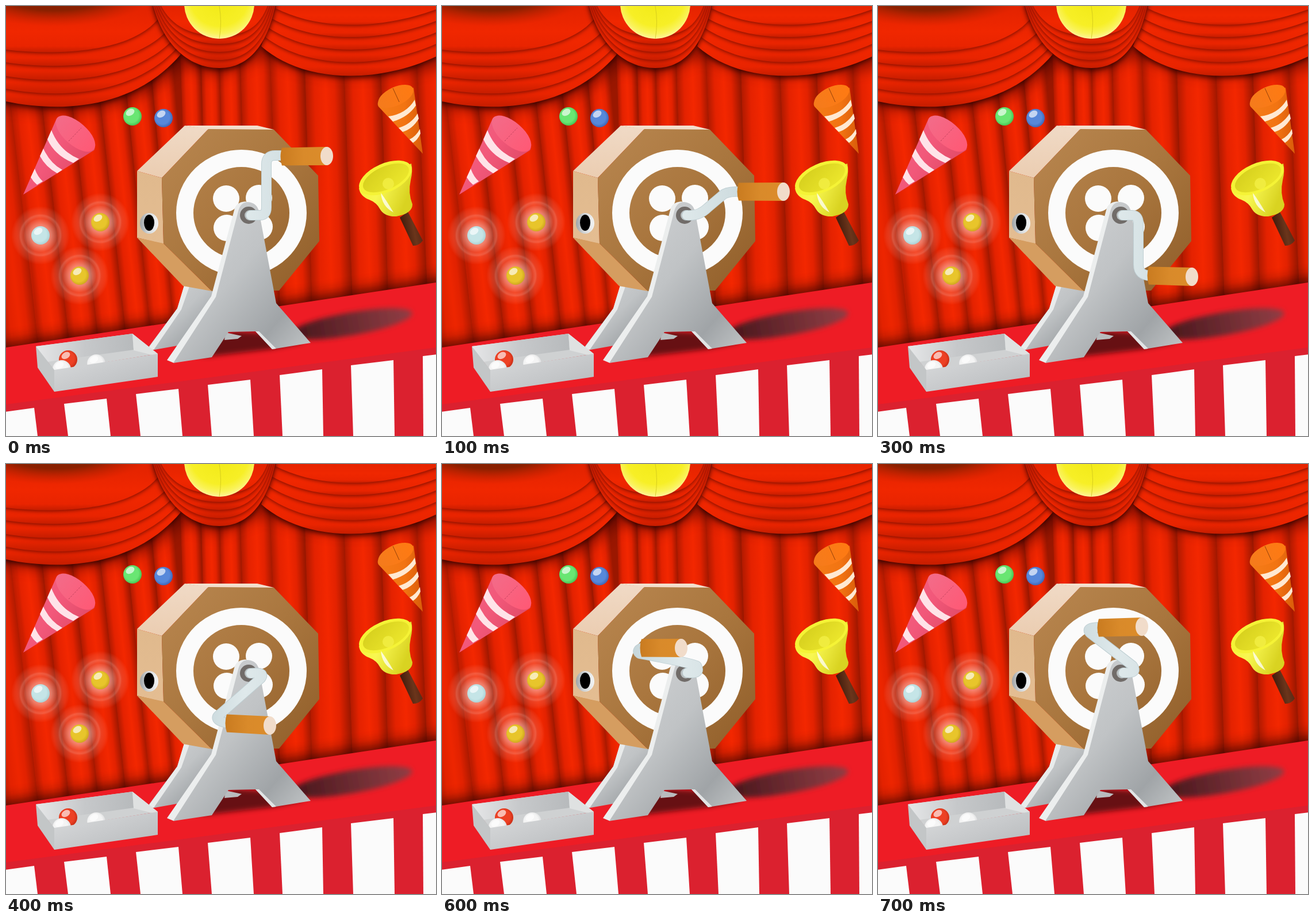
These frames come from a looping animation (748 by 748 pixels, 0.8 s). An HTML page:

```html
<!DOCTYPE html>
<html lang="en">
<head>
<meta charset="utf-8">
<title>Raffle drum</title>
<style>
html, body { margin: 0; width: 100%; height: 100%; overflow: hidden; background: #e62300; }
svg { display: block; width: 100%; height: 100%; }
.swag path { filter: drop-shadow(0 2px 3px rgba(95, 8, 0, .75)); }
.swag path:first-child { filter: drop-shadow(0 3px 5px rgba(35, 0, 0, .85)); }
</style>
</head>
<body>
<svg viewBox="0 0 748 748" preserveAspectRatio="none">
  <defs id="defs">
    <filter id="blur4" x="-30%" y="-60%" width="160%" height="220%"><feGaussianBlur stdDeviation="4"/></filter>
    <filter id="blur12" x="-30%" y="-60%" width="160%" height="220%"><feGaussianBlur stdDeviation="12"/></filter>
    <clipPath id="curtainClip"><path d="M0 0H748V482L0 595Z"/></clipPath>
  </defs>

  <g clip-path="url(#curtainClip)">
    <g id="folds"></g>
    <path d="M-40 601L790 475V520L-40 645Z" fill="#250000" stroke="#250000" stroke-width="14" opacity=".8" filter="url(#blur12)"/>
    <path d="M-20 160Q210 200 300 90L370 108L450 75Q560 130 770 92" fill="none" stroke="#400500" stroke-width="22" opacity=".6" filter="url(#blur12)"/>
  </g>

  <g id="left" class="swag"></g>
  <ellipse cx="85" cy="-8" rx="165" ry="62" fill="url(#swagDark)"/>
  <g id="right" class="swag"></g>
  <g id="mid" class="swag"></g>
  <circle cx="371" cy="-4" r="61" fill="url(#lamp)"/>
  <path d="M371 0Q376 28 371 57" fill="none" stroke="#cfc51c" stroke-width=".8"/>

  <path d="M0 594L748 481V748H0Z" fill="#ee1c25"/>
  <path d="M0 693L748 594V748H0Z" fill="#db212f"/>
  <g id="stripes" fill="#fbfbfb"></g>

  <!-- party cones -->
  <path d="M30 328L87 198Q90 190 98 193L150 238Q157 246 153 251Z" fill="url(#pink)"/>
  <g fill="#ffe3e8">
    <path d="M79 216Q93 252 127 266L117 273Q85 260 72 232Z"/>
    <path d="M65 248Q77 274 98 285L89 291Q69 280 59 261Z"/>
    <path d="M50 283Q55 297 64 305L54 311Q47 305 43 298Z"/>
  </g>
  <ellipse cx="121" cy="222" rx="42" ry="20" transform="rotate(41 121 222)" fill="url(#pinkMouth)"/>
  <path d="M109 235L131 212" stroke="#b23c56" stroke-width=".8" stroke-dasharray="3 2"/>

  <path d="M725 257L648 175Q644 168 652 160L709 142Z" fill="url(#orange)"/>
  <g fill="#ffe9d2">
    <path d="M665 192Q696 188 711 163L713 173Q700 193 673 201Z"/>
    <path d="M683 212Q704 206 716 187L718 196Q707 214 690 219Z"/>
    <path d="M702 232Q713 227 720 214L721 222Q716 233 708 238Z"/>
  </g>
  <ellipse cx="678" cy="157" rx="33" ry="16" transform="rotate(-25 678 157)" fill="url(#orangeMouth)"/>
  <path d="M673 143L684 167" stroke="#8a3c08" stroke-width=".9"/>

  <!-- hand bell -->
  <path d="M685 368L699 358L725 408Q719 417 708 417Z" fill="url(#wood)"/>
  <path d="M614 317Q616 331 632 337Q645 342 651 354Q659 367 679 366Q707 361 707 345Q699 325 704 303Q708 287 705 274Z" fill="url(#bell)"/>
  <ellipse cx="660" cy="299" rx="49" ry="25" transform="rotate(-24 660 299)" fill="#f5f336"/>
  <ellipse cx="661" cy="299" rx="43" ry="20" transform="rotate(-24 661 299)" fill="url(#bellIn)"/>
  <circle cx="665" cy="309" r="10" fill="#f2ef45" opacity=".8"/>
  <path d="M652 325Q654 349 674 359Q661 337 652 325Z" fill="#fff" opacity=".75"/>

  <g id="balls"></g>

  <!-- shadows on the table -->
  <ellipse cx="600" cy="553" rx="108" ry="20" transform="rotate(-10 600 553)" fill="url(#cast)" filter="url(#blur4)"/>
  <path d="M303 604L398 566L470 570L520 585L462 597L350 610Z" fill="#3b070b" opacity=".75" filter="url(#blur4)"/>

  <!-- rear leg -->
  <path d="M310 486L368 496L357 522L303 590L258 598L246 596L298 526Z" fill="url(#steel)"/>
  <path d="M310 486L319 488L305 528L257 598L246 597L298 526Z" fill="#e9ebeb"/>
  <path d="M382 568L410 574L403 579L380 581Z" fill="#b9bcbe"/>

  <!-- drum -->
  <path d="M311 208H437L466 215L352 215Z" fill="#f3dfcd"/>
  <path d="M311 208L352 214L271 299L228 287Z" fill="url(#bevel)"/>
  <path d="M228 287L271 299L274 414L228 403Z" fill="url(#side)"/>
  <path d="M228 403L274 413L358 496L308 487Z" fill="#d59d60"/>
  <path d="M352 214L466 215L543 295L545 409L475 495L358 496L274 413L271 299Z" fill="url(#face)"/>
  <ellipse cx="409.500" cy="360" rx="98.500" ry="95" fill="none" stroke="#fbfbfb" stroke-width="30"/>
  <g fill="#fbfbfb">
    <circle cx="383" cy="335" r="23"/><circle cx="440" cy="334" r="23"/>
    <circle cx="384" cy="386" r="23"/><circle cx="441" cy="384" r="23"/>
  </g>
  <ellipse cx="249" cy="378" rx="16" ry="18" fill="url(#rim)"/>
  <ellipse cx="249" cy="377" rx="9" ry="14" fill="#000"/>

  <!-- front stand -->
  <path d="M280 616L357 505L397 355Q400 341 417 340L428 350L380 515L292 621Z" fill="#eceeee"/>
  <path d="M291 621L365 506L404 357Q408 341 421 341Q436 342 440 357L470 517L530 586L463 597L434 566L387 567L358 611Z" fill="url(#steel)"/>
  <path d="M434 566L440 566L470 596L463 597Z" fill="#e2e4e5"/>
  <circle cx="422" cy="364" r="15" fill="#716c69"/>
  <circle cx="424" cy="364" r="9" fill="#b9bebf"/>

  <g id="crank"></g>

  <!-- tray -->
  <path d="M52 592L220 570L264 605L84 634Z" fill="#cfd1d2"/>
  <path d="M52 592L220 570L222 598L65 620Z" fill="url(#trayBack)"/>
  <path d="M220 570L264 605L258 608L222 599Z" fill="#dfe1e1"/>
  <g id="prizes"></g>
  <path d="M52 592L84 633V671L55 629Z" fill="#c3c6c7"/>
  <path d="M84 633L264 605V645L84 671Z" fill="url(#trayFront)"/>
</svg>
<script>
const $ = id => document.getElementById(id);
const add = (id, markup) => $(id).insertAdjacentHTML('beforeend', markup);
const stops = list => list.map(([o, c, a = 1]) =>
  `<stop offset="${o}" stop-color="${c}" stop-opacity="${a}"/>`).join('');
const linear = (id, box, list, attrs = '') => {
  const [x1, y1, x2, y2] = box;
  add('defs', `<linearGradient id="${id}" x1="${x1}" y1="${y1}" x2="${x2}" y2="${y2}" ${attrs}>${stops(list)}</linearGradient>`);
};
const radial = (id, cx, cy, r, list) =>
  add('defs', `<radialGradient id="${id}" cx="${cx}" cy="${cy}" r="${r}">${stops(list)}</radialGradient>`);

linear('steel', [0, 0, 1, 1], [[0, '#d3d5d7'], [.45, '#c0c3c5'], [.75, '#a0a4a7'], [1, '#c9cccd']]);
linear('face', [0, 0, 1, 1], [[0, '#b98750'], [.5, '#a9763e'], [1, '#8f5d29']]);
linear('bevel', [0, 0, 0, 1], [[0, '#f0dac6'], [1, '#ebcdb1']]);
linear('side', [0, 0, 0, 1], [[0, '#e0b98d'], [1, '#e4bd92']]);
linear('rim', [0, 0, 1, 0], [[0, '#9fa4a7'], [.4, '#cfd3d5'], [1, '#f4f5f5']]);
linear('trayFront', [0, 0, 1, 1], [[0, '#dadcdd'], [.5, '#c8cacc'], [1, '#b5b8ba']]);
linear('trayBack', [0, 0, 1, 0], [[0, '#e6e7e8'], [.5, '#c6c8ca'], [1, '#b7babc']]);
linear('pink', [0, 0, 1, .7], [[0, '#f06482'], [.5, '#f2587a'], [1, '#dc4762']]);
linear('pinkMouth', [0, 0, 1, 0], [[0, '#f36b89'], [1, '#ff5975']]);
linear('orange', [0, 0, 1, 0], [[0, '#f57d18'], [.6, '#f27412'], [1, '#d95c0a']]);
linear('orangeMouth', [0, 0, 1, 0], [[0, '#f57b1c'], [1, '#ff7a12']]);
linear('wood', [0, .3, 1, 0], [[0, '#3c190b'], [.5, '#6b351b'], [1, '#4a2010']]);
linear('bell', [0, 0, 1, .4], [[0, '#f6f331'], [.5, '#f8f751'], [1, '#d9d321']]);
linear('bellIn', [0, 0, 1, 1], [[0, '#d4cd1c'], [1, '#efea2e']]);
linear('cast', [0, 0, 1, 0], [[0, '#3d1318', .95], [.5, '#5d2c32', .9], [1, '#7a454b', .8]]);
linear('grip', [0, 0, 1, 0], [[0, '#c97b20'], [.5, '#d98a2a'], [1, '#dc8c2a']]);
linear('tube', [0, 0, 1, 0], [[0, '#c6d6da'], [.45, '#dfe9eb'], [1, '#cddbde']],
  'gradientUnits="userSpaceOnUse"');
radial('swagDark', .5, .3, .55, [[0, '#7a1d00'], [.6, '#852000', .95], [1, '#c02000', 0]]);
radial('lamp', .5, .4, .6, [[0, '#f1e914'], [.7, '#f7ef26'], [.88, '#faf35a'], [1, '#fff39a']]);
radial('halo', .5, .5, .5, [[0, '#fff', .5], [.35, '#fff', .42], [.58, '#fff', .16],
  [.68, '#fff', .25], [.74, '#fff', .13], [.88, '#fff', .08], [1, '#fff', 0]]);

// curtain folds: x of each crease at y 100 and y 600
const creases = [[-55, 0], [0, 58], [55, 112], [108, 163], [157, 212], [205, 255], [252, 296],
  [304, 320], [340, 352], [372, 385], [408, 422], [460, 480], [520, 535], [588, 606],
  [652, 668], [715, 738], [775, 800]];
creases.slice(1).forEach(([a, b], i) => {
  const [c, d] = creases[i], m = (d - c) / 500, mid = (c + d) / 2;
  const w = (a + b) / 2 - mid;
  linear('fold' + i, [mid, 350, mid + w, 350 - m * w],
    [[0, '#b21a00'], [.22, '#e42200'], [.5, '#f32700'], [.72, '#e32200'], [1, '#9b1700']],
    'gradientUnits="userSpaceOnUse"');
  const top = (x, y) => x - (y - x) / 5;
  add('folds', `<path d="M${top(c, d)} 0H${top(a, b) + .5}L${b + .5} 600H${d}Z" fill="url(#fold${i})"/>`);
});
add('folds', '<path d="M-80 0H0L58 600H-80Z" fill="#d92000" opacity=".25"/>');

// draped swags, lowest layer first
linear('drape', [0, 0, 0, 1], [[0, '#df2200'], [.6, '#f02700'], [.88, '#e92400'], [1, '#c51d00']]);
const drape = (id, d) => add(id, `<path d="${d}" fill="url(#drape)"/>`);
[[166, 187, 304, 84], [144, 163, 298, 72], [122, 138, 291, 58], [98, 113, 281, 42], [76, 88, 268, 18]]
  .forEach(([y, low, x, end]) =>
    drape('left', `M-9 -9V${y - 2}L0 ${y}C${100} ${low} ${225} ${low - 10} ${x} ${end}L255 -9Z`));
[[444, 70, 134, 88], [451, 54, 109, 66], [457, 38, 86, 46], [463, 22, 63, 26], [469, 4, 41, 6]]
  .forEach(([x, y, low, end]) =>
    drape('right', `M470 -9L${x} ${y}C${x + 70} ${low - 2} 640 ${low + 4} 748 ${end}L757 ${end - 2}V-9Z`));
[[0, 108], [3, 94], [6, 80], [9, 66], [12, 52]].forEach(([inset, low]) => {
  const k = low * 1.3;
  drape('mid', `M${254 + inset} -9C${270 + inset} ${k * .45} ${315} ${low} 371 ${low}C${425} ${low} ${457 - inset} ${k * .45} ${470 - inset} -9Z`);
});

// white bands on the table front: top left, top right, bottom left, bottom right
[[-2, 706, 49, 699, -2, 55], [101, 692, 175, 683, 108, 182], [226, 675, 300, 666, 234, 307],
 [351, 659, 425, 650, 358, 431], [476, 642, 550, 632, 481, 552], [600, 625, 674, 616, 604, 676],
 [725, 609, 750, 606, 726, 750]].forEach(([a, y, b, z, c, d]) =>
  add('stripes', `<path d="M${a} ${y}L${b} ${z}L${d} 748H${c}Z"/>`));

const ball = (id, x, y, color, edge, r = 16) => {
  const key = 'g' + color.slice(1);
  if (!$(key)) radial(key, .45, .45, .58, [[0, color], [.65, color], [1, edge]]);
  add(id, `<circle cx="${x}" cy="${y}" r="${r}" fill="url(#${key})"/>
    <ellipse cx="${x - 4}" cy="${y - 7}" rx="8" ry="5.500" transform="rotate(-30 ${x - 4} ${y - 7})" fill="#fff" opacity=".65"/>`);
};
[[60, 399], [164, 376], [128, 469]].forEach(([x, y]) =>
  add('balls', `<circle cx="${x}" cy="${y}" r="51" fill="url(#halo)"/>`));
ball('balls', 220, 192, '#69e673', '#42c04e');
ball('balls', 274, 195, '#5788da', '#3b62b4');
ball('balls', 60, 399, '#c5e5e7', '#a9cfd2');
ball('balls', 164, 376, '#e8c52b', '#cda41c');
ball('balls', 128, 469, '#e8c52b', '#cda41c');
ball('prizes', 157, 622, '#f4f4f4', '#d8d9da');
ball('prizes', 108, 615, '#ed4124', '#c82c14');
ball('prizes', 97, 632, '#f4f4f4', '#d8d9da');

// crank poses: arm path, grip start x y, grip end x y
const poses = [
  ['M426 364H442Q453 364 453 350V275Q453 260 468 260H484', 480, 262, 558, 261],
  ['M426 364Q447 366 462 351L488 329Q496 322 518 323', 516, 323, 594, 323],
  ['M426 363Q447 362 462 375L484 394Q496 405 518 405', 516, 405, 594, 407],
  ['M426 364H442Q453 364 453 378V450Q453 469 474 469', 471, 469, 546, 471],
  ['M426 364Q452 361 443 373L369 438Q362 446 386 451', 384, 451, 459, 455],
  ['M427 364Q452 360 444 374Q432 382 346 395Q337 399 348 406', 347, 408, 417, 412],
  ['M427 363Q451 366 443 351Q428 345 344 330Q337 324 348 320', 347, 320, 416, 320],
  ['M427 363Q453 365 443 351L369 294Q360 284 386 284', 384, 285, 459, 283]
];
$('tube').setAttribute('x1', 330);
$('tube').setAttribute('x2', 520);
poses.forEach(([arm, x, y, u, v]) => add('crank', `<g visibility="hidden">
  <path d="${arm}" fill="none" stroke="#bfcfd3" stroke-width="18" stroke-linecap="round" stroke-linejoin="round"/>
  <path d="${arm}" fill="none" stroke="url(#tube)" stroke-width="16" stroke-linecap="round" stroke-linejoin="round"/>
  <path d="M${x} ${y - 15.5}L${u} ${v - 16}V${v + 16}L${x} ${y + 15.5}Q${x - 5} ${y} ${x} ${y - 15.5}Z" fill="url(#grip)"/>
  <ellipse cx="${u}" cy="${v}" rx="11" ry="16" fill="#f1dcca"/></g>`));

const cranks = [...$('crank').children];
const start = performance.now();
function draw() {
  const step = Math.floor((performance.now() - start) / 100) % cranks.length;
  cranks.forEach((g, i) => g.setAttribute('visibility', i === step ? 'visible' : 'hidden'));
  requestAnimationFrame(draw);
}
draw();
</script>
</body>
</html>
```
